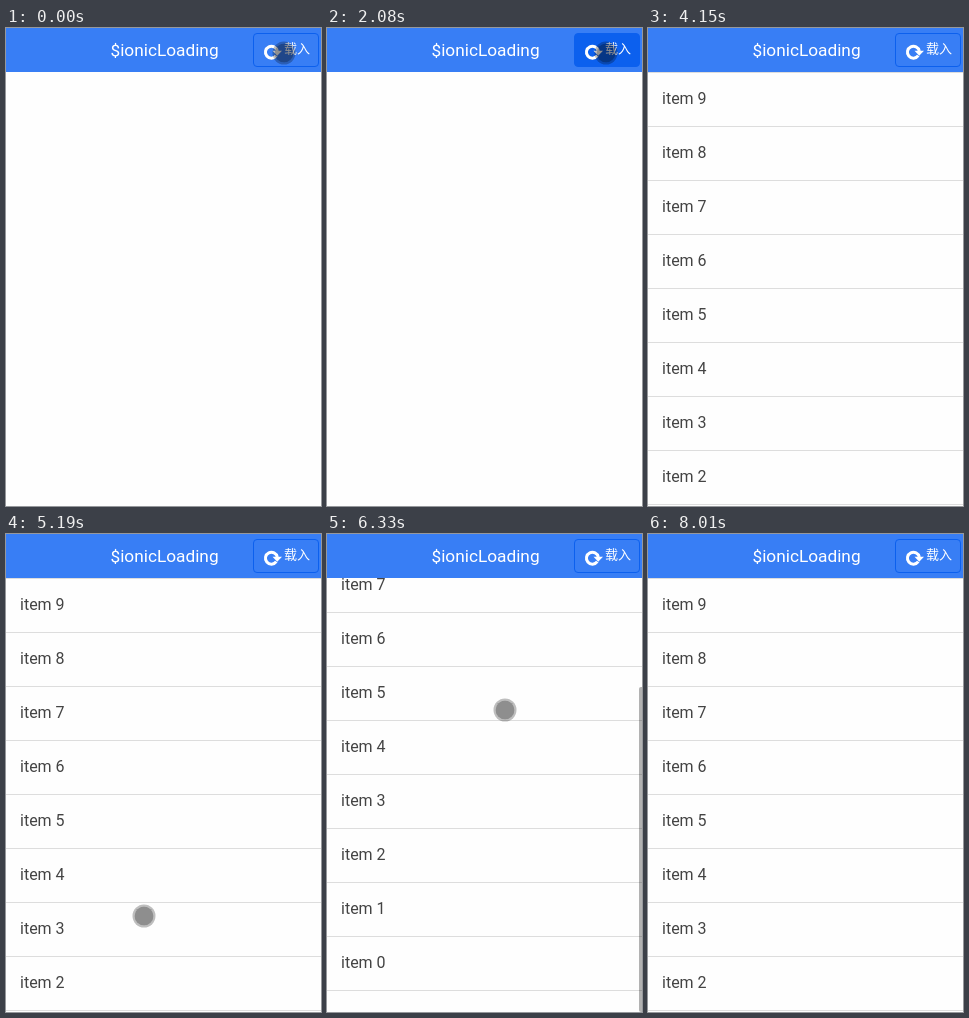
An HTML page that plays this animation: 315x478 px, repeating every 8720 ms.

```html
<!DOCTYPE html>
<html lang="zh-CN">
<head>
<meta charset="utf-8">
<title>$ionicLoading</title>
<style>
html, body { margin: 0; width: 100%; height: 100%; overflow: hidden; background: #fefefe; }
body, body * { box-sizing: border-box; }
#stage {
  position: relative; width: 315px; height: 478px; overflow: hidden; background: #fefefe;
  font-family: Roboto, "Noto Sans CJK SC", "Noto Sans CJK", sans-serif;
}
#stage > * { position: absolute; }
#content { left: 0; top: 44px; width: 315px; height: 434px; overflow: hidden; }
#list { border-bottom: 1px solid #ddd; }
#list div {
  height: 54px; padding-left: 14px; border-top: 1px solid #ddd;
  font-size: 16px; line-height: 51px; color: #444;
}
#bar { left: 312px; width: 3px; border-radius: 2px 0 0 2px; background: rgba(0, 0, 0, .3); }
#header { left: 0; top: 0; width: 315px; height: 44px; background: #387ef5; color: #fff; }
#header > * { position: absolute; }
#title { left: 1px; width: 315px; text-align: center; font-size: 17.25px; line-height: 44px; }
#button { left: 247px; top: 5px; width: 66px; height: 34px; border: 1px solid #0c60ee; border-radius: 4px; }
#button.active { background: #0c60ee; }
#label { left: 278px; top: 11px; font-size: 13px; line-height: 20px; white-space: nowrap; }
#icon { left: 256px; top: 12.5px; }
#backdrop { inset: 0; background: rgba(0, 0, 0, .4); }
#popup {
  left: 57px; top: 210px; width: 202px; height: 60px; padding: 0 20px; border-radius: 5px;
  background: rgba(0, 0, 0, .7); color: #fff; font-size: 15px; line-height: 60px; white-space: nowrap;
}
#cursor {
  left: -11.5px; top: -11.5px; width: 23px; height: 23px; border-radius: 50%;
  background: rgba(0, 0, 0, .44); background-clip: padding-box; border: 2px solid rgba(0, 0, 0, .25);
}
</style>
</head>
<body>
<div id="stage">
  <div id="content"><div id="list"></div></div>
  <div id="bar"></div>
  <div id="header">
    <div id="title">$ionicLoading</div>
    <div id="button"></div>
    <svg id="icon" width="22" height="22">
      <path d="M14.3 14.7A6 6 0 1 1 15.3 10" fill="none" stroke="#fff" stroke-width="3"/>
      <path d="M10.5 9.8H20L15.2 14.8Z" fill="#fff"/>
    </svg>
    <div id="label">载入</div>
  </div>
  <div id="backdrop"></div>
  <div id="popup">正在载入数据，请稍后...</div>
  <div id="cursor"></div>
</div>
<script>
const LOOP = 8720, TICK = 120, MAX_SCROLL = 107;
const PRESS = 2080, DIM = 2200, POPUP = 2350, LOADED = 4150;
const DRAG = 5340, RELEASE = 6990, FADE = 7740;
const $ = id => document.getElementById(id);

const easeOut = p => Math.sin(p * Math.PI / 2);
const within = (t, from, to) => t >= from && t < to;
const show = (id, on) => { $(id).style.visibility = on ? "visible" : "hidden"; };

// Eased value that advances once per tick and then rests
function move(t, { start, steps, from, to, tick = TICK }) {
  const done = Math.min(steps, Math.floor((t - start) / tick)) / steps;
  return from + (to - from) * easeOut(done);
}

// Negative offsets pull the list past its top
const gestures = [
  { start: DRAG, steps: 3, from: -24, to: -37 },
  { start: 5820, steps: 1, from: 50, to: 122 },
  { start: 6090, steps: 2, from: 125, to: 128 },
  { start: 6480, steps: 3, from: 82, to: -50 },
  { start: RELEASE, steps: 3, from: -9, to: 0, tick: 150 }
];

function scrollAt(t) {
  const gesture = gestures.findLast(g => t >= g.start);
  return gesture ? Math.round(move(t, gesture)) : 0;
}

const glides = [
  { start: 0, end: POPUP, steps: 1, from: [277.5, 24.5], to: [278.5, 24.5] },
  { start: POPUP, end: 2620, steps: 1, from: [277.5, 78.5], to: [273.5, 154.5] },
  { start: 4710, end: DRAG, steps: 4, from: [240.5, 125.5], to: [137.5, 381.5] }
];

// The finger travels further than the list beyond either edge
function fingerAt(scroll) {
  const over = Math.max(0, scroll - MAX_SCROLL), pull = Math.min(0, scroll);
  const y = 316.5 - scroll - pull - .6 * over;
  return [Math.round(141 + (390.5 - y) * .168) + .5, Math.round(y - .5) + .5];
}

function pointerAt(t, scroll) {
  if (within(t, DRAG, RELEASE)) return fingerAt(scroll);
  const glide = glides.find(g => within(t, g.start, g.end));
  return glide && [0, 1].map(i => move(t, { ...glide, from: glide.from[i], to: glide.to[i] }));
}

function drawBar(t, scroll) {
  const down = Math.max(0, scroll);
  const top = 45 + Math.round(.74 * down + .65 * Math.max(0, down - MAX_SCROLL));
  const bottom = Math.min(478, top + 354 + Math.min(0, scroll));
  const faded = t < FADE ? 0 : Math.floor((t - FADE) / TICK + 1) / 3;
  Object.assign($("bar").style, {
    top: top + "px", height: bottom - top + "px", opacity: Math.max(0, 1 - faded)
  });
  show("bar", t >= DRAG);
}

function draw(t) {
  const scroll = scrollAt(t), pointer = pointerAt(t, scroll);
  show("cursor", pointer);
  if (pointer) $("cursor").style.transform = `translate(${pointer[0]}px, ${pointer[1]}px)`;
  $("button").classList.toggle("active", within(t, PRESS, POPUP));
  show("backdrop", within(t, DIM, LOADED));
  show("popup", within(t, POPUP, LOADED));
  show("list", t >= LOADED);
  $("list").style.transform = `translateY(${-scroll}px)`;
  drawBar(t, scroll);
}

for (let n = 9; n >= 0; n--) {
  const item = document.createElement("div");
  item.textContent = "item " + n;
  $("list").append(item);
}

const begin = performance.now();
function tick() {
  draw((performance.now() - begin) % LOOP);
  requestAnimationFrame(tick);
}
tick();
</script>
</body>
</html>
```
